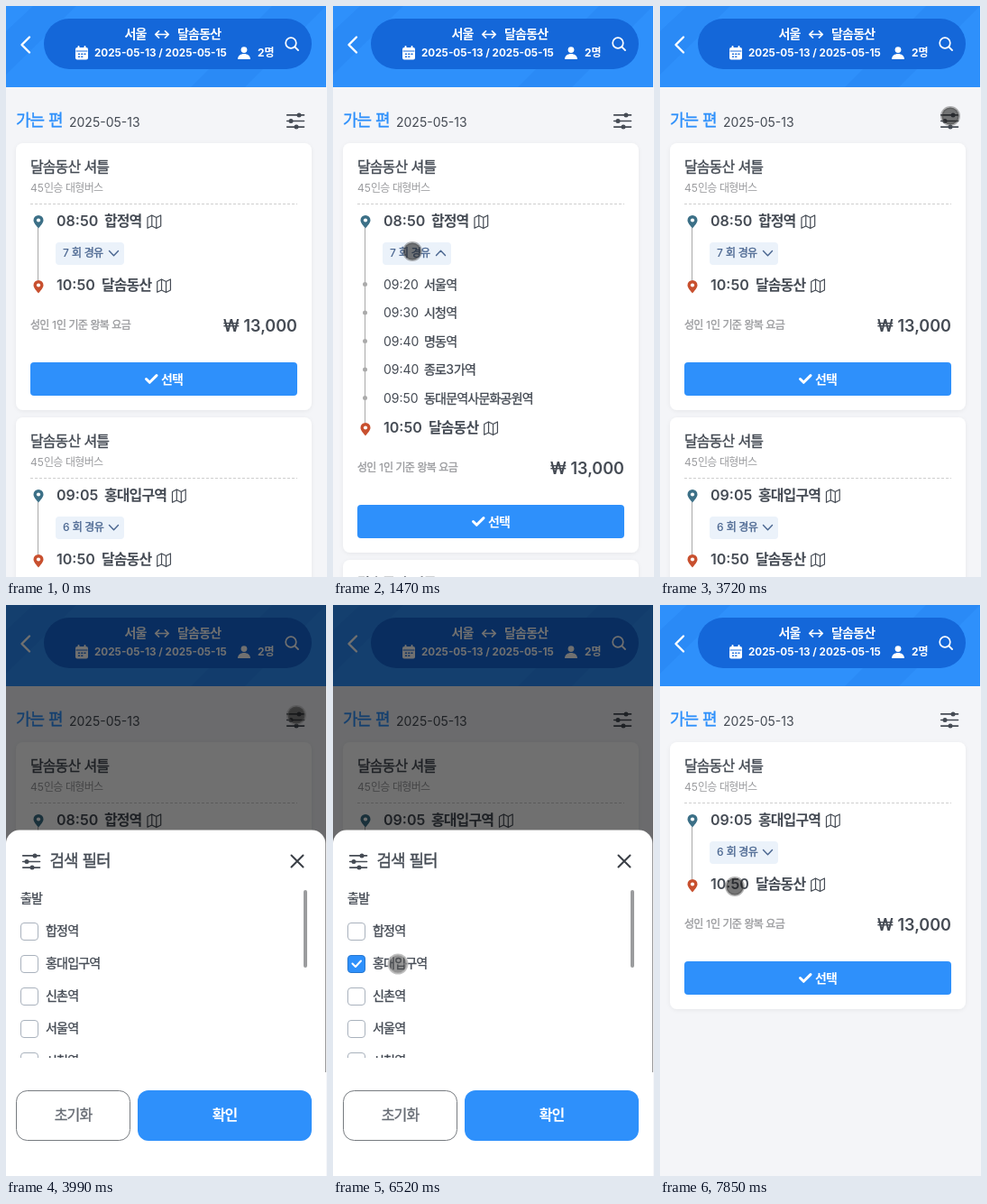
Recreate the animation shown at these times as an HTML page. Size 356 by 633 pixels, loop 7990 ms.

```html
<!DOCTYPE html>
<html lang="ko">
<head>
<meta charset="utf-8">
<title>셔틀 예약</title>
<style>
  html, body { margin: 0; width: 100%; height: 100%; overflow: hidden; background: #f4f5f8; }
  svg { display: block; width: 356px; height: 633px; font-family: Inter, "Noto Sans CJK KR", "Noto Sans CJK", sans-serif; }
  .ko { letter-spacing: -.057em; }
  .line { fill: none; stroke-linecap: round; stroke-linejoin: round; }
  .dark { fill: rgba(20, 20, 20, .58); stroke: rgba(70, 70, 70, .4); stroke-width: 3px; }
  .light { fill: rgba(75, 75, 75, .6); stroke: rgba(185, 185, 185, .85); stroke-width: 2px; }
  text { white-space: pre; }
  /* The Korean face has no medium cut, so a hairline outline thickens it */
  .medium .ko { stroke: currentColor; stroke-width: .35px; }
</style>
</head>
<body>
<svg id="stage" viewBox="0 0 356 633"></svg>
<script>
const LOOP = 7990, TICK = 133, LEAD = 12;
const BLUE = '#2e90fb', INK = '#454b54', GREY = '#9b9c9f';
const PARK = '달솜동산';

// All times below are in ticks.
const SCENES = [
  { start: 0, view: 'list' }, { start: 11, view: 'expanded' }, { start: 19, view: 'list' },
  { start: 30, view: 'sheet' }, { start: 49, view: 'checked' }, { start: 56, view: 'filtered' }
];

// Each gesture follows a curve from, bend, to, then rests until the next one or until it hides.
const GESTURES = [
  { start: 2, end: 8, from: [242, 499], bend: [70, 270], to: [88, 272], ease: 3, press: 8 },
  { start: 19, end: 28, from: [88, 272], bend: [410, 200], to: [322, 122], ease: 1, press: 28 },
  { start: 34, end: 35, from: [303, 164], bend: [303, 164], to: [303, 164], ease: 1, hide: 35 },
  { start: 40, end: 46, from: [213, 276], bend: [0, 390], to: [72, 398], ease: 2, press: 46 },
  { start: 49, end: 52, from: [72, 398], bend: [270, 500], to: [245, 575], ease: 2, press: 54 },
  { start: 56, end: 59, from: [239, 568], bend: [200, 470], to: [83, 312], ease: 1, press: 59 }
];

const tight = s => s.replace(/[가-힣]+/g, m => `<tspan class="ko">${m}</tspan>`);

const text = (x, y, s, size, weight = 400, fill = INK, anchor = 'start') =>
  `<text x="${x}" y="${y}" font-size="${size}" font-weight="${weight}" fill="${fill}" color="${fill}"
    text-anchor="${anchor}" class="${weight === 500 ? 'medium' : ''}">${tight(s)}</text>`;

const rect = (x, y, w, h, r, fill, extra = '') =>
  `<rect x="${x}" y="${y}" width="${w}" height="${h}" rx="${r}" fill="${fill}" ${extra}/>`;

const path = (d, stroke, width = 1.5) =>
  `<path class="line" d="${d}" stroke="${stroke}" stroke-width="${width}"/>`;

const dot = (x, y, r, fill) => `<circle cx="${x}" cy="${y}" r="${r}" fill="${fill}"/>`;

const at = (x, y, body) => `<g transform="translate(${x} ${y})">${body}</g>`;

const pin = (y, fill) => at(36, y,
  `<path d="M0 7.500c-2-2.600-5.500-6-5.500-9a5.500 5.500 0 0 1 11 0c0 3-3.500 6.400-5.500 9z" fill="${fill}"/>` +
  dot(0, -1.5, 2.1, '#fff'));

const mapIcon = (x, y) =>
  at(x, y, path('M.7-4.5 5.5-7v12L.7 7.3zM5.5-7l5 2.5v12l-5-2.5M10.5-4.5 15.4-7V5l-4.9 2.5', INK, 1.2));

const filterIcon = (x, y) => at(x, y, [14, 5, 11].map((knob, i) => {
  const row = (i - 1) * 6.6;
  return path(`M.7 ${row}H19.5`, INK, 1.6) + dot(knob, row, 2.5, INK);
}).join(''));

function header() {
  const calendar = at(77, 46, rect(0, 0, 14, 13.5, 2, '#fff') + path('M3.500-1v2M10.500-1v2', '#fff', 2) +
    path('M1 4h12', '#1668da', 1) + path('M3.500 7.300h1M6.800 7.300h1M10 7.300h1M3.500 10.300h1M6.800 10.300h1', '#1668da', 1.4));
  const person = dot(264, 48.6, 3.4, '#fff') + '<path d="M257 59c0-8 14-8 14 0z" fill="#fff"/>';
  return rect(0, 0, 355, 90, 0, BLUE) +
    '<path d="M0 28 30 0H78L0 76zM205 90 295 0H355L265 90z" fill="#2a8af6"/>' +
    rect(42, 14, 297, 56, 28, '#1467d9') +
    path('M26 34.500 17.500 43 26 51.500', '#fff', 2.4) +
    text(131.5, 36, '서울', 14, 700, '#fff') +
    path('M166 31.500h14M169.500 27.800l-3.800 3.700 3.800 3.700M176.500 27.800l3.800 3.700-3.800 3.700', '#fff', 1.7) +
    text(190, 36, PARK, 14, 700, '#fff') + calendar +
    text(98, 56, '2025-05-13 / 2025-05-15', 11.7, 700, '#fff') + person +
    text(279, 56, '2명', 12, 700, '#fff') +
    '<circle class="line" cx="316" cy="41" r="5.800" stroke="#fff" stroke-width="1.700"/>' +
    path('M320.300 45.300 324 49', '#fff', 1.8);
}

// One leg of the route: bold time, place name and map icon around centre line y
const stopRow = (y, time, place, x) =>
  text(56, y + 5.5, time, 16, 600) + text(x, y + 5.5, place, 16, 600) +
  mapIcon(x + place.length * 13.76 + 6, y + .5);

function viaRows() {
  const places = ['서울역', '시청역', '명동역', '종로3가역', '동대문역사문화공원역'];
  const minutes = ['20', '30', '40', '40', '50'];
  return places.map((place, i) => at(0, 156.5 + i * 31.5,
    dot(35.5, 0, 2.5, '#aaa') + text(56, 5, '09:' + minutes[i], 14) + text(101, 5, place, 14, 500))).join('');
}

function card(top, time, place, via, expanded = false) {
  const extra = expanded ? 158 : 0;
  const end = 158 + extra;
  const chevron = expanded ? 'M114.500 124.500l5-5.200 5 5.200' : 'M114.500 119.500l5 5.200 5-5.200';
  const footer = at(0, extra,
    text(27, 206, '성인 1인 기준 왕복 요금', 12, 500, GREY) +
    text(323, 208.5, '₩ 13,000', 18, 600, INK, 'end') +
    rect(27, 243, 296, 37, 4, BLUE) + path('M155.500 261.500l3.800 3.800 7.700-7.700', '#fff', 3) +
    text(172, 266.5, '선택', 14, 700, '#fff'));
  return at(0, top,
    rect(11, 0, 328, 296 + extra, 8, '#fff', 'filter="url(#soft)"') +
    text(27, 31.5, PARK + ' 셔틀', 16, 500) +
    text(27, 54, '45인승 대형버스', 12, 400, GREY) +
    '<path d="M27 67.500H323" stroke="#cfcfcf" stroke-dasharray="3 2"/>' +
    `<path d="M35.500 94V${end - 6}" stroke="#aaa"/>` +
    pin(87, '#3c7087') + pin(end + 1, '#c8502f') +
    stopRow(86.5, time, place, 109) +
    rect(55, 110, 76, 25, 4, '#ebf2fa') +
    text(63, 126, via + ' 회 경유', 12, 500, '#4a6690') + path(chevron, '#4a6690', 1.4) +
    (expanded ? viaRows() : '') + stopRow(end - .5, '10:50', PARK, 106) + footer);
}

function results(cards) {
  return header() + text(11, 132.5, '가는 편', 18, 500, BLUE) + text(70, 134, '2025-05-13', 14) +
    filterIcon(311, 127.5) + cards;
}

function checkbox(y, label, on) {
  return at(16, y,
    rect(.5, -9.5, 19, 19, 3.5, on ? BLUE : '#fff', `stroke="${on ? '#2878d0' : '#a9b2bd'}"`) +
    (on ? path('M5.500-.500l3.500 3.500 6-6.500', '#fff', 2) : '') + text(28, 4, label, 14, 500));
}

function sheet(chosen) {
  const options = ['합정역', '홍대입구역', '신촌역', '서울역', '시청역']
    .map((name, i) => checkbox(362 + i * 36, name, name === chosen)).join('');
  return rect(0, 0, 355, 633, 0, '#000', 'opacity=".56"') +
    rect(0, 249.5, 354.3, 300, 15, '#fff') + rect(0, 518, 355, 115, 0, '#fff') +
    filterIcon(18, 284.5) + text(48.5, 290, '검색 필터', 18, 500) +
    path('M316.500 277.500l13 13M329.500 277.500l-13 13', '#3a3f46', 2) +
    text(16, 330, '출발', 14, 500) +
    `<g clip-path="url(#scroll)">${options}</g>` + rect(330, 316, 4, 86, 2, '#9b9c9e') +
    rect(11.5, 538.5, 126, 55, 12, '#fff', 'stroke="#777b80"') +
    text(74.5, 571, '초기화', 16, 500, '#666b73', 'middle') +
    rect(146, 538, 193, 56, 12, BLUE) + text(242.5, 571, '확인', 16, 700, '#fff', 'middle');
}

const early = (top, expanded) => card(top, '08:50', '합정역', 7, expanded);
const late = top => card(top, '09:05', '홍대입구역', 6);
const list = results(early(152) + late(456));
const filtered = results(late(152));
const views = {
  list,
  expanded: results(early(152, true) + late(614)),
  sheet: list + sheet(),
  checked: filtered + sheet('홍대입구역'),
  filtered
};

const stage = document.getElementById('stage');
stage.innerHTML = `<defs>
  <filter id="soft" x="-5%" y="-5%" width="110%" height="112%"><feDropShadow dx="0" dy="1" stdDeviation="2" flood-opacity=".06"/></filter>
  <clipPath id="scroll"><rect y="340" width="326" height="162"/></clipPath></defs>` +
  rect(0, 0, 356, 633, 0, '#f4f5f8') +
  Object.entries(views).map(([name, body]) => `<g id="${name}">${body}</g>`).join('') +
  '<circle id="pointer"/>';

const groups = Object.keys(views).map(name => document.getElementById(name));
const pointer = document.getElementById('pointer');
const current = (items, tick) => items.findLast(item => item.start <= tick);

function placePointer(tick) {
  const g = current(GESTURES, tick);
  const visible = g && !(tick >= g.hide);
  pointer.style.display = visible ? '' : 'none';
  if (!visible) return;
  const progress = Math.min(1, (tick - g.start) / (g.end - g.start));
  const s = 1 - (1 - progress) ** g.ease;
  const [x, y] = g.from.map((a, i) => (1 - s) ** 2 * a + 2 * s * (1 - s) * g.bend[i] + s * s * g.to[i]);
  const pressed = tick >= g.press;
  pointer.setAttribute('cx', x);
  pointer.setAttribute('cy', y);
  pointer.setAttribute('r', pressed ? 9.5 : 10.5);
  pointer.setAttribute('class', pressed ? 'dark' : 'light');
}

function draw() {
  const tick = Math.floor((performance.now() % LOOP + LEAD) / TICK);
  const { view } = current(SCENES, tick);
  for (const g of groups) g.style.display = g.id === view ? '' : 'none';
  placePointer(tick);
  requestAnimationFrame(draw);
}
draw();
</script>
</body>
</html>
```
